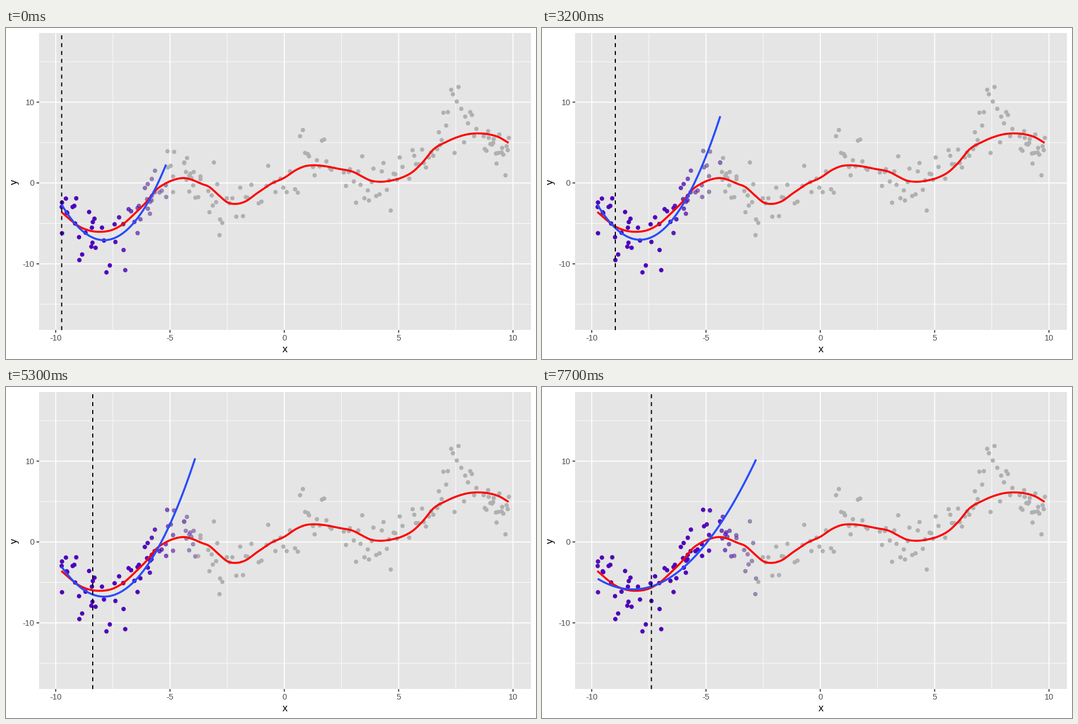
Recreate the animation shown at these times as a matplotlib script. Size 947 by 592 pixels, loop 8 s.

```python
import numpy as np
import matplotlib.pyplot as plt
from matplotlib.animation import FuncAnimation
from matplotlib.colors import to_rgb
from matplotlib.patches import Rectangle

# Stage units are pixels, y pointing down.
W, H, DPI = 947, 592, 64
PX = 72 / DPI
LEFT, RIGHT, TOP, BOTTOM = 59.2, 937.8, 9.2, 540.3
BANDWIDTH = 187.7
FRAME_MS, FRAMES = 100, 80

GREY, PURPLE = "#b0b0b0", "#4e00be"
RED, BLUE = "#ff0000", "#284bff"

plt.rcParams["font.family"] = "Liberation Sans"


def sx(x):
    return 497.3 + 40.85 * x


def sy(y):
    return 277.2 - 14.46 * y


def smooth(knots, step=3):
    """Cubic Hermite curve through the knots."""
    kx, ky = np.array(knots, float).T
    slope = np.gradient(ky, kx)
    x = np.linspace(kx[0], kx[-1], int((kx[-1] - kx[0]) / step))
    i = np.clip(np.searchsorted(kx, x) - 1, 0, len(kx) - 2)
    h = kx[i + 1] - kx[i]
    t = (x - kx[i]) / h
    y = ((2 * t**3 - 3 * t**2 + 1) * ky[i] + (t**3 - 2 * t**2 + t) * h * slope[i]
         + (3 * t**2 - 2 * t**3) * ky[i + 1] + (t**3 - t**2) * h * slope[i + 1])
    return x, y


trend_x, trend_y = smooth([
    (99, 329), (116, 344), (131, 355), (148, 362), (168, 364.5), (190, 361),
    (210, 350), (230, 332), (250, 312), (270, 288), (285, 278), (300, 271.5),
    (320, 268.5), (335, 272.5), (350, 279), (362, 283.5), (380, 299),
    (396, 312), (412, 314.5), (426, 311), (450, 294.5), (475, 278),
    (497, 268), (520, 253), (535, 247), (550, 245.5), (565, 246.5),
    (595, 252), (622, 258), (637, 266), (652, 273), (667, 275), (690, 272.5),
    (710, 266.5), (727, 257), (742, 243), (765, 216), (785, 204.5),
    (807, 195), (825, 190), (845, 188.5), (862, 190), (882, 196), (898, 205.5)])

# Sorted by x: the points the moving window passes over.
near = np.array([
    (99.5, 320), (100, 312), (100, 367), (107, 305), (108.5, 329.5),
    (109.5, 331), (119, 320), (122, 318), (123.5, 349.5), (125.5, 304.5),
    (130.5, 374), (131, 415), (136, 405), (142, 366), (148.5, 329),
    (152.5, 391), (153.5, 357), (154.5, 384), (155, 347), (158, 341),
    (160, 393), (171.5, 357), (175, 380), (179.5, 437), (185.5, 424.5),
    (194, 351), (195.5, 382.5), (202, 338.5), (209.5, 350.5), (210, 397),
    (213, 433), (219, 324), (223.5, 327.5), (229.5, 346.5), (235, 322),
    (235, 366.5), (237.5, 318), (240, 342), (248, 286), (252, 306),
    (253, 279), (253.5, 323), (257, 332), (257.5, 310.5), (260, 308),
    (260.5, 300), (260.5, 269.5), (265.5, 293.5), (266, 255), (274, 293.5),
    (278, 290.5), (285.5, 281), (286, 302), (287.8, 219.5), (289.5, 249),
    (294.5, 245.5), (298.5, 264.5), (298.5, 292.5), (300, 220.5), (318, 240),
    (318.5, 241), (321, 257), (322, 270.5), (323, 232), (327, 291.5),
    (327.5, 263.5), (329, 260), (331, 267.5), (334, 281), (335, 257),
    (338, 302.5), (343.5, 301.5), (347, 265), (347.5, 270)])

# x range, count, mean offset from the trend, spread
CLUSTERS = [
    (361, 386, 10, 12, 33), (394, 438, 9, 6, 22), (451, 521, 12, 6, 22),
    (525, 581, 14, -16, 27), (603, 708, 26, 3, 25), (720, 773, 13, -4, 18),
    (775, 840, 18, -32, 29), (853, 898, 20, 14, 26)]


def scattered(rng, x0, x1, n, offset, spread):
    x = np.linspace(x0, x1, n)
    x[1:-1] += rng.uniform(-0.4, 0.4, n - 2) * (x1 - x0) / n
    noise = np.clip(rng.normal(0, 1, n), -2, 2)
    return np.column_stack([x, np.interp(x, trend_x, trend_y) + offset + spread * noise])


rng = np.random.default_rng(12)
points = np.vstack([near] + [scattered(rng, *c) for c in CLUSTERS])

fig = plt.figure(figsize=(W / DPI, H / DPI), dpi=DPI, facecolor="white")
ax = fig.add_axes([0, 0, 1, 1])
ax.set_xlim(0, W)
ax.set_ylim(H, 0)
ax.axis("off")


def line(x, y, color, width, z, **kw):
    return ax.plot(x, y, color=color, lw=width * PX, zorder=z, snap=False,
                   solid_capstyle="butt", dash_capstyle="butt", **kw)[0]


def label(x, y, text, size, color, **kw):
    ax.text(x, y, text, fontsize=size * PX, color=color, va="baseline", **kw)


def dots(xy, color):
    return ax.scatter(*xy.T, s=(6.52 * PX) ** 2, c=color, lw=1.18 * PX, zorder=3)


ax.add_patch(Rectangle((LEFT, TOP), RIGHT - LEFT, BOTTOM - TOP, fc="#e5e5e5", lw=0, zorder=0))
for v in (-7.5, -2.5, 2.5, 7.5):
    line([sx(v)] * 2, [TOP, BOTTOM], "white", 0.9, 1)
for v in (-15, -5, 5, 15):
    line([LEFT, RIGHT], [sy(v)] * 2, "white", 0.9, 1)
for v in (-10, -5, 0, 5, 10):
    line([sx(v)] * 2, [TOP, BOTTOM], "white", 1.78, 2)
    line([sx(v)] * 2, [BOTTOM, BOTTOM + 4.6], "#333333", 1.78, 2)
    label(sx(v), 559, str(v), 14.67, "#4d4d4d", ha="center")
for v in (-10, 0, 10):
    line([LEFT, RIGHT], [sy(v)] * 2, "white", 1.78, 2)
    line([LEFT - 4.6, LEFT], [sy(v)] * 2, "#333333", 1.78, 2)
    label(51, sy(v) + 5.3, str(v), 14.67, "#4d4d4d", ha="right")
label(498.3, 580, "x", 18.33, "black", ha="center")
label(20, 275, "y", 18.33, "black", ha="center", rotation=90, rotation_mode="anchor")

dots(points, GREY)
window = points[points[:, 0] < 400]
active = dots(window, PURPLE)
line(trend_x, trend_y, RED, 3.56, 4)
fit = line([], [], BLUE, 3.56, 5)
focus = line([], [], "black", 2, 6, linestyle=(0, (3.515, 3.515)))


def local_fit(x0):
    """Tricube-weighted quadratic around x0, over the points in the window."""
    x, y = window.T
    d = np.abs(x - x0) / BANDWIDTH
    inside = d <= 1
    weight = np.where(inside, (1 - np.minimum(d, 1) ** 3) ** 3, 0)
    coef = np.polyfit((x - x0) / BANDWIDTH, y, 2, w=np.sqrt(weight))
    gx = np.linspace(x[inside].min(), x[inside].max(), 80)
    return inside, weight, gx, np.polyval(coef, (gx - x0) / BANDWIDTH)


def update(frame):
    t = frame * FRAME_MS
    step = 0 if t < 200 else 1 + (t - 200) // 300
    x0 = near[step, 0]
    inside, weight, gx, gy = local_fit(x0)
    rgba = np.zeros((len(window), 4))
    rgba[:, :3] = to_rgb(PURPLE)
    rgba[:, 3] = np.where(inside, np.minimum(1, 0.2 + 1.1 * weight), 0)
    active.set_facecolor(rgba)
    active.set_edgecolor(rgba)
    fit.set_data(gx, gy)
    focus.set_data([x0, x0], [BOTTOM, TOP])
    return active, fit, focus


anim = FuncAnimation(fig, update, frames=FRAMES, interval=FRAME_MS, repeat=True, repeat_delay=0)
plt.show()
```
